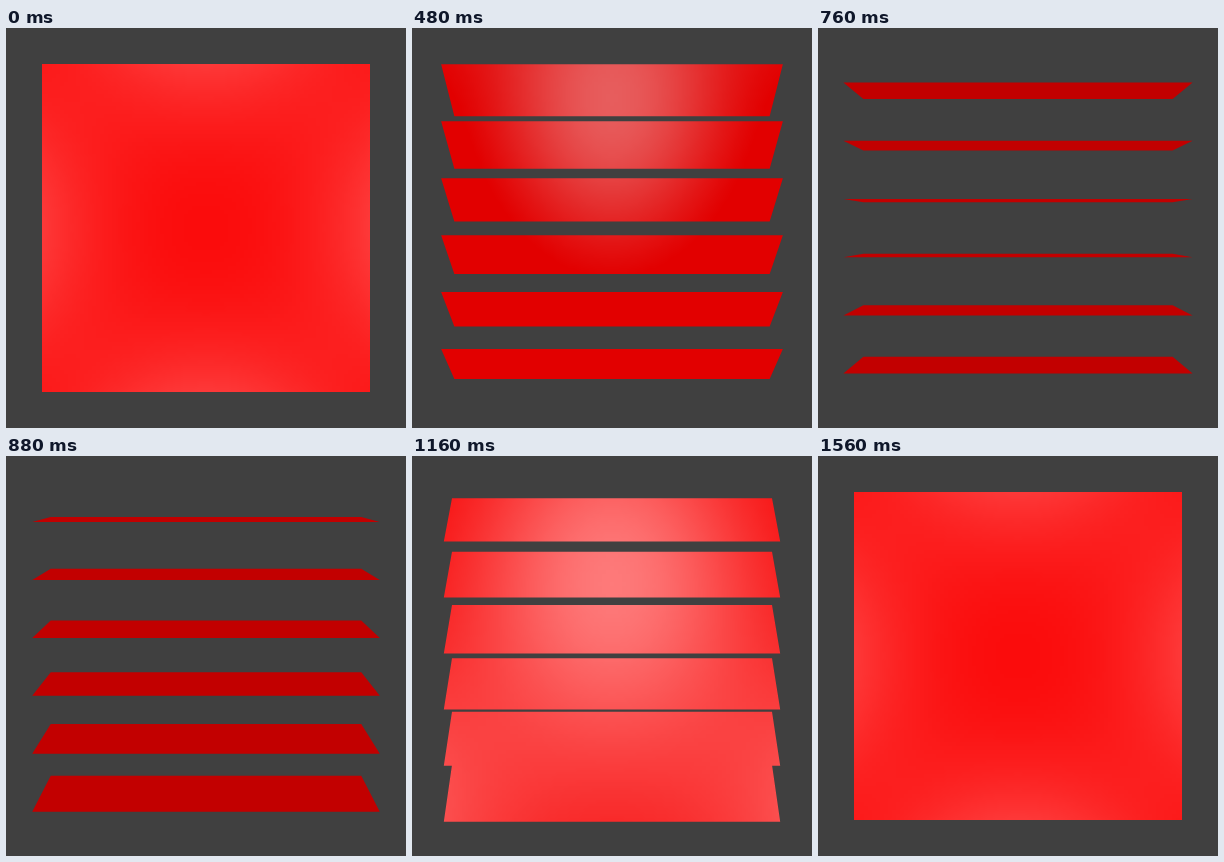
Write an HTML page with a canvas that moves like this. It is 400 px wide and 400 px high and loops after 1600 ms.

```html
<!DOCTYPE html>
<html lang="en">
<head>
<meta charset="utf-8">
<title>Turning blinds</title>
<style>
  html, body { margin: 0; width: 100%; height: 100%; overflow: hidden; background: #404040; }
  canvas { display: block; width: 400px; height: 400px; }
</style>
</head>
<body>
<canvas id="stage" width="400" height="400"></canvas>
<script>
const SIZE = 400, MID = SIZE / 2;
const LOOP = 1600, STEP = 40, TURN = 1538, LEAD = 10;
const SLATS = 6, HALF_W = 164, HALF_H = HALF_W / SLATS;
const EYE = 450;
const LIGHTS = [[500, 0, 270], [-500, 0, 270], [0, 500, 270], [0, -500, 270]];
const SHINE = 122;

const ctx = document.getElementById("stage").getContext("2d");

// The lighting is soft, so it is shaded on a coarse grid and scaled up.
const GRID = 100, CELL = SIZE / GRID;
const glow = document.createElement("canvas");
glow.width = glow.height = GRID;
const glowCtx = glow.getContext("2d");
const shade = glowCtx.createImageData(GRID, GRID);

const clamp = (v, lo, hi) => Math.min(hi, Math.max(lo, v));

function angleAt(ms) {
  const p = clamp((ms + LEAD) / TURN, 0, 1);
  return Math.PI * (1 - Math.cos(Math.PI * p)) / 2;
}

// Sum of the Phong highlights at a point whose normal is (0, ny, nz).
function highlight(x, y, ny, nz, power) {
  const viewLen = Math.hypot(x, y, EYE);
  let sum = 0;
  for (const [a, b, c] of LIGHTS) {
    const lx = a - x, ly = b - y;
    const d = ny * ly + nz * c;
    if (d <= 0) continue;
    const ry = 2 * d * ny - ly, rz = 2 * d * nz - c;
    const dot = (lx * x - ry * y + rz * EYE) / (Math.hypot(lx, ly, c) * viewLen);
    if (dot > 0) sum += dot ** power;
  }
  return sum;
}

function paintGlow(angle) {
  const side = Math.cos(angle) < 0 ? -1 : 1;
  const ny = Math.sin(angle) * side, nz = Math.cos(angle) * side;
  const tilt = Math.acos(nz) * 180 / Math.PI;
  const fade = Math.max(0, (tilt - 24) / 18);
  const base = 194 + 56 * clamp((nz * nz - 0.14) * 1.35, 0, 1);
  const data = shade.data;
  for (let j = 0, k = 0; j < GRID; j++) {
    for (let i = 0; i < GRID; i++, k += 4) {
      const x = (i + 0.5) * CELL - MID, y = (j + 0.5) * CELL - MID;
      const white = Math.max(0, SHINE * highlight(x, y, ny, nz, 5 + 5 * fade) - 30 * fade);
      data[k] = base + white * 0.06;
      data[k + 1] = data[k + 2] = white;
      data[k + 3] = 255;
    }
  }
  glowCtx.putImageData(shade, 0, 0);
}

function slatPath(angle) {
  const dy = HALF_H * Math.cos(angle), z = HALF_H * Math.sin(angle);
  const near = EYE / (EYE - z), far = EYE / (EYE + z);
  const path = new Path2D();
  for (let i = 0; i < SLATS; i++) {
    const cy = (2 * i + 1 - SLATS) * HALF_H;
    const y1 = MID + (cy - dy) * near, y2 = MID + (cy + dy) * far;
    path.moveTo(MID - HALF_W * near, y1);
    path.lineTo(MID + HALF_W * near, y1);
    path.lineTo(MID + HALF_W * far, y2);
    path.lineTo(MID - HALF_W * far, y2);
    path.closePath();
  }
  return path;
}

function draw(now) {
  const angle = angleAt(Math.floor((now % LOOP) / STEP) * STEP);
  paintGlow(angle);
  ctx.fillStyle = "#404040";
  ctx.fillRect(0, 0, SIZE, SIZE);
  ctx.save();
  ctx.clip(slatPath(angle));
  ctx.drawImage(glow, 0, 0, SIZE, SIZE);
  ctx.restore();
  requestAnimationFrame(draw);
}

draw(0);
</script>
</body>
</html>
```
